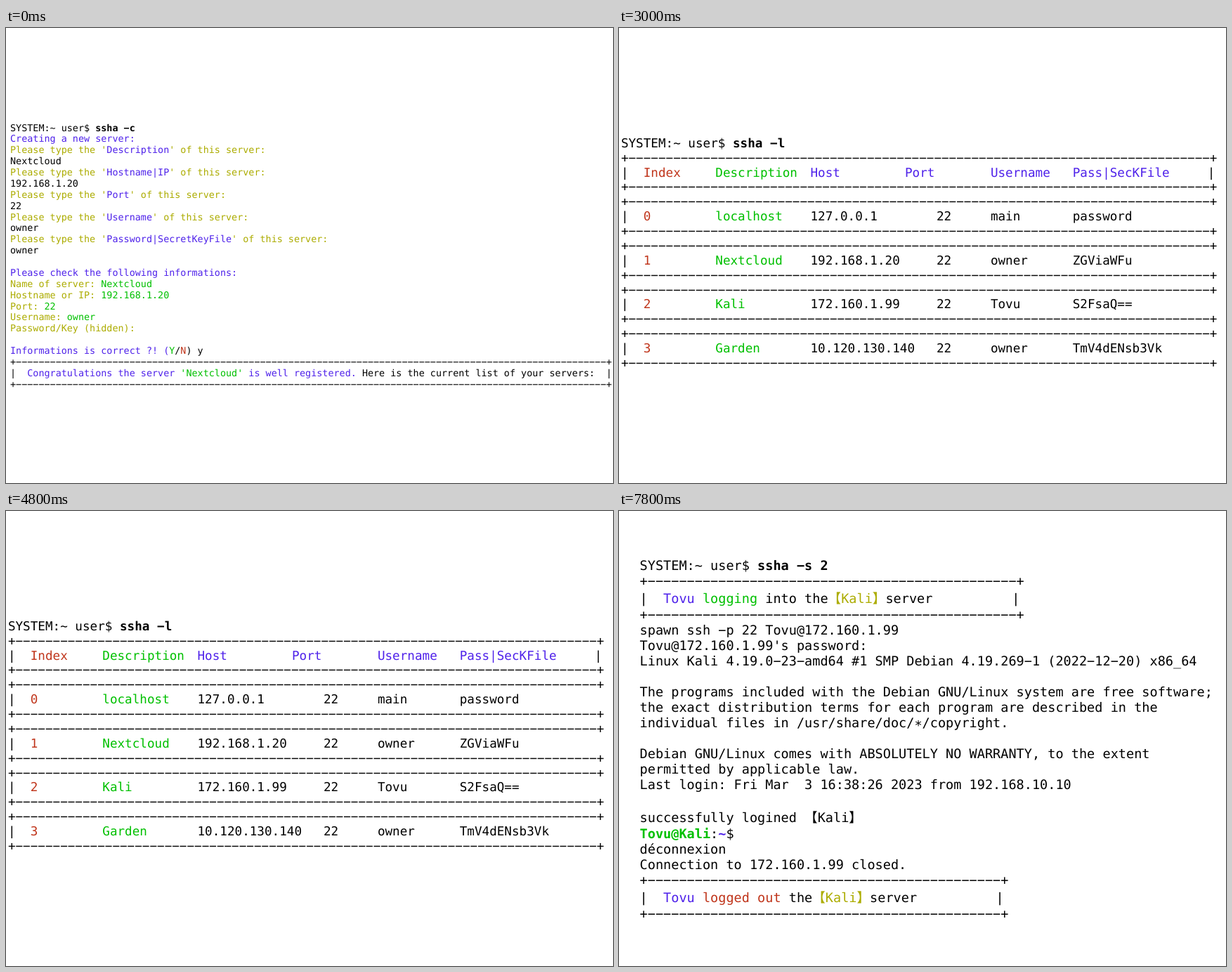
An HTML page with a canvas that plays this animation: 864x648 px, repeating every 9000 ms.

```html
<!DOCTYPE html>
<html lang="en">
<head>
<meta charset="utf-8">
<title>Terminal session</title>
<style>
  html, body { margin: 0; width: 100%; height: 100%; overflow: hidden; background: #fff; }
  canvas { display: block; }
</style>
</head>
<body>
<canvas id="stage" width="864" height="648"></canvas>
<script>
const ctx = document.getElementById('stage').getContext('2d');
const FAMILY = '"DejaVu Sans Mono", "Noto Sans CJK SC", "Noto Sans CJK JP", monospace';
const COLORS = { k: '#000', b: '#4f22ea', y: '#acac00', g: '#00c000', r: '#c0361c' };
const GLYPHS = { '-': '\u2212', '*': '\u2217' }; // wide dash, centred asterisk
const WIDE = /[【】]/;
const SCENE_MS = 3000;

const rule = n => '+' + '-'.repeat(n) + '+';
const ask = what => `^yPlease type the '^b${what}^y' of this server:`;
const field = (label, value) => `^y${label}: ^g${value}`;

// Markup: ^k ^b ^y ^g ^r set a regular colour, ^B turns bold on.
function print(text, x, y, size) {
  const advance = size * 0.602;
  const setFont = weight => { ctx.font = `${weight} ${size}px ${FAMILY}`; };
  setFont('normal');
  ctx.fillStyle = COLORS.k;
  for (let i = 0; i < text.length; i++) {
    const ch = text[i];
    if (ch === '^') {
      const code = text[++i];
      setFont(code === 'B' ? 'bold' : 'normal');
      if (code !== 'B') ctx.fillStyle = COLORS[code];
      continue;
    }
    if (ch !== ' ') ctx.fillText(GLYPHS[ch] || ch, x, y);
    x += WIDE.test(ch) ? size : advance;
  }
}

const createLines = [
  'SYSTEM:~ user$ ^Bssha -c',
  '^bCreating a new server:',
  ask('Description'), 'Nextcloud',
  ask('Hostname|IP'), '192.168.1.20',
  ask('Port'), '22',
  ask('Username'), 'owner',
  ask('Password|SecretKeyFile'), 'owner',
  '',
  '^bPlease check the following informations:',
  field('Name of server', 'Nextcloud'),
  field('Hostname or IP', '192.168.1.20'),
  field('Port', '22'),
  field('Username', 'owner'),
  '^yPassword/Key (hidden):',
  '',
  '^bInformations is correct ?! (^gY^k/^rN^k) y',
  rule(104),
  "|  ^bCongratulations the server ^g'Nextcloud'^b is well registered.^k Here is the current list of your servers:  |",
  rule(104)
];

function drawCreate() {
  createLines.forEach((line, i) => print(line, 6, 146.6 + i * 15.87, 13.42));
}

const servers = [
  ['localhost', '127.0.0.1', 'main', 'password'],
  ['Nextcloud', '192.168.1.20', 'owner', 'ZGViaWFu'],
  ['Kali', '172.160.1.99', 'Tovu', 'S2FsaQ=='],
  ['Garden', '10.120.130.140', 'owner', 'TmV4dENsb3Vk']
];

function drawList() {
  const put = (text, x, row) => print(text, x, 169.8 + row * 20.88, 17.62);
  const putRow = (row, index, name, host, port, portX, user, pass, tint) => {
    put(rule(78), 2.9, row - 1);
    put('|', 2.9, row);
    put('^r' + index, 34.7, row);
    put('^g' + name, 137.3, row);
    put(tint + host, 272.5, row);
    put(tint + port, portX, row);
    put(tint + user, 528.9, row);
    put(tint + pass, 645.7, row);
    put(rule(78), 2.9, row + 1);
  };
  put('SYSTEM:~ user$ ^Bssha -l', 2.9, 0);
  putRow(2, 'Index', 'Description', 'Host', 'Port', 407, 'Username', 'Pass|SecKFile', '^b');
  put('|', 837.7, 2);
  servers.forEach(([name, host, user, pass], i) =>
    putRow(5 + i * 3, i, name, host, '22', 452, user, pass, '^k'));
}

const sessionLines = [
  'SYSTEM:~ user$ ^Bssha -s 2',
  rule(47),
  '|  ^bTovu ^glogging ^kinto the^y【Kali】^kserver',
  rule(47),
  'spawn ssh -p 22 Tovu@172.160.1.99',
  "Tovu@172.160.1.99's password:",
  'Linux Kali 4.19.0-23-amd64 #1 SMP Debian 4.19.269-1 (2022-12-20) x86_64',
  '',
  'The programs included with the Debian GNU/Linux system are free software;',
  'the exact distribution terms for each program are described in the',
  'individual files in /usr/share/doc/*/copyright.',
  '',
  'Debian GNU/Linux comes with ABSOLUTELY NO WARRANTY, to the extent',
  'permitted by applicable law.',
  'Last login: Fri Mar  3 16:38:26 2023 from 192.168.10.10',
  '',
  'successfully logined 【Kali】',
  '^g^BTovu@Kali^k:^b^B~^k$',
  'déconnexion',
  'Connection to 172.160.1.99 closed.',
  rule(45),
  '|  ^bTovu ^rlogged out ^kthe^y【Kali】^kserver',
  rule(45)
];
const closingBars = { 2: 559.2, 21: 536.4 };

function drawSession() {
  const size = 18.55;
  let y = 83.5;
  sessionLines.forEach((line, i) => {
    const tall = WIDE.test(line);
    if (tall) y += 3.3;
    print(line, 29.6, y, size);
    if (closingBars[i]) print('|', closingBars[i], y, size);
    y += tall ? 23 : 22;
  });
}

const scenes = [drawCreate, drawList, drawSession];
const start = performance.now();

function frame() {
  const elapsed = performance.now() - start;
  ctx.fillStyle = '#fff';
  ctx.fillRect(0, 0, 864, 648);
  ctx.textRendering = 'geometricPrecision';
  scenes[Math.floor(elapsed / SCENE_MS) % scenes.length]();
  requestAnimationFrame(frame);
}
frame();
</script>
</body>
</html>
```
